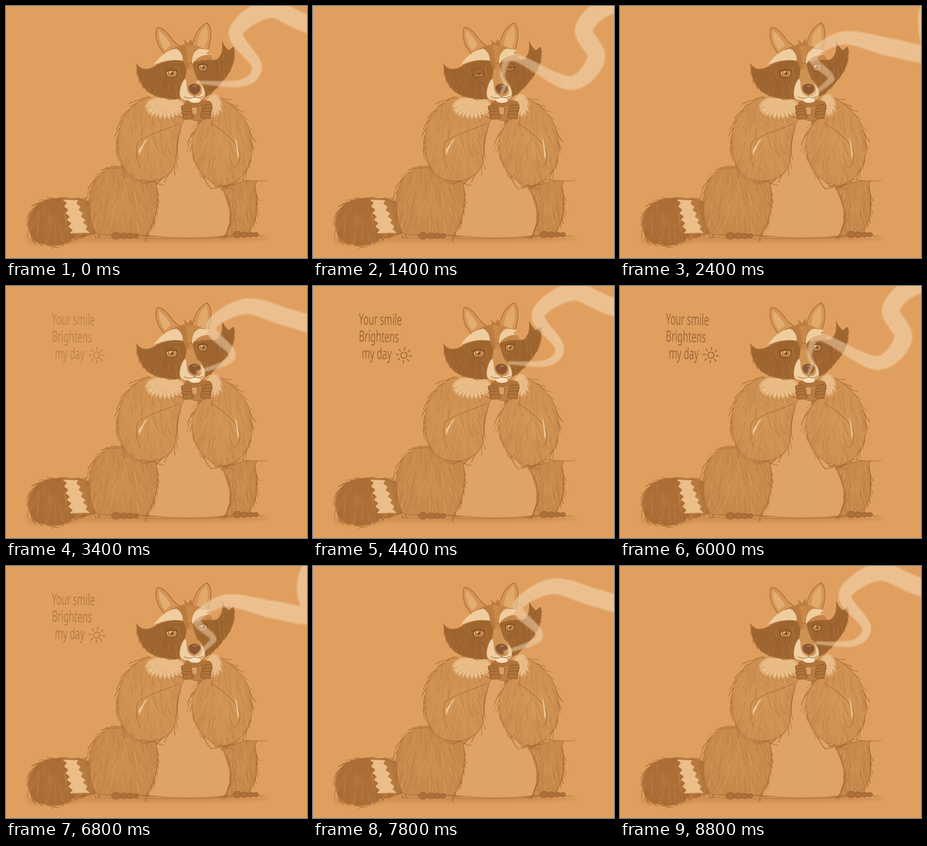
Animation of 500x419 px, one loop 9000 ms. Source, as an HTML page with a canvas:

```html
<!DOCTYPE html>
<html lang="en">
<head>
<meta charset="utf-8">
<title>Raccoon with a cup</title>
<style>
html, body { margin: 0; width: 100%; height: 100%; overflow: hidden; background: #e09f5e; }
canvas { display: block; width: 100vw; height: 100vh; }
</style>
</head>
<body>
<canvas id="stage"></canvas>
<script>
const W = 500, H = 419, LOOP = 9000, STEP = 200, CYCLE = 22;
const INK = '#a96c36', DARK = '#8a5529', MASK = '#a2682f', CREAM = '#f0cd9e';
const scale = Math.max(1, window.devicePixelRatio || 1);
const stage = document.getElementById('stage');
const still = document.createElement('canvas');
for (const c of [stage, still]) { c.width = W * scale; c.height = H * scale; }
const out = stage.getContext('2d');
let g = still.getContext('2d');
out.scale(scale, scale);
g.scale(scale, scale);

let seed = 7;
const rnd = () => (seed = (seed * 16807) % 2147483647) / 2147483647;
const mix = (a, b, t) => a + (b - a) * t;
const clamp = v => Math.max(0, Math.min(1, v));
const smooth = v => (v = clamp(v)) * v * (3 - 2 * v);

function shape(d, fill, line, width = 1, alpha = 1) {
  const p = new Path2D(d);
  g.save();
  g.globalAlpha = alpha;
  g.lineCap = g.lineJoin = 'round';
  if (fill) { g.fillStyle = fill; g.fill(p); }
  if (line) { g.strokeStyle = line; g.lineWidth = width; g.stroke(p); }
  g.restore();
}

function oval(x, y, rx, ry, fill, line) {
  g.beginPath();
  g.ellipse(x, y, rx, ry, 0, 0, 7);
  if (fill) { g.fillStyle = fill; g.fill(); }
  if (line) { g.strokeStyle = line; g.lineWidth = 1; g.stroke(); }
}

function hair(x, y, ang, len) {
  const c = Math.cos(ang) * len, s = Math.sin(ang) * len;
  g.beginPath();
  g.moveTo(x, y);
  g.quadraticCurveTo(x + c / 2 - s * .12, y + s / 2 + c * .12, x + c, y + s);
  g.stroke();
}

// Filled outline with soft strokes inside and hairs that follow its edge downwards
function fur(d, light, dark, { len = 15, gap = 9, coat = 120, soft = .1 } = {}) {
  const path = document.createElementNS('http://www.w3.org/2000/svg', 'path');
  path.setAttribute('d', d);
  const total = path.getTotalLength();
  const edge = Array.from({ length: 60 }, (_, i) => path.getPointAtLength(total * i / 60));
  const cx = edge.reduce((s, p) => s + p.x, 0) / 60, cy = edge.reduce((s, p) => s + p.y, 0) / 60;
  const tone = g.createRadialGradient(cx, cy, 5, cx, cy, Math.sqrt(total) * 4);
  tone.addColorStop(0, light);
  tone.addColorStop(1, dark);
  shape(d, tone, INK, .8, 1);
  g.save();
  g.clip(new Path2D(d));
  g.lineWidth = 1.6;
  g.globalAlpha = soft;
  for (let i = 0; i < coat; i++) {
    const p = edge[Math.floor(rnd() * 60)], t = Math.sqrt(rnd());
    g.strokeStyle = i % 3 ? DARK : '#f3c48c';
    hair(mix(cx, p.x, t), mix(cy, p.y, t), Math.PI / 2 + (cx - p.x) * .006 + rnd() * .3 - .15, 10 + rnd() * 16);
  }
  g.restore();
  g.save();
  g.strokeStyle = INK;
  g.globalAlpha = .85;
  g.lineCap = 'round';
  for (let at = 0; at < total; at += gap * (.5 + rnd())) {
    const p = path.getPointAtLength(at), q = path.getPointAtLength((at + 1) % total);
    const flip = q.y < p.y ? -1 : 1;
    const tx = (q.x - p.x) * flip, ty = (q.y - p.y) * flip;
    const side = tx * (p.y - cy) - ty * (p.x - cx) > 0 ? 1 : -1;
    g.lineWidth = .7 + rnd() * .8;
    hair(p.x, p.y, Math.atan2(ty, tx) + side * (.05 + rnd() * .22), len * (.6 + rnd() * .6));
  }
  g.restore();
}

function ground() {
  g.fillStyle = '#e09f5e';
  g.fillRect(0, 0, W, H);
  g.save();
  g.filter = `blur(${2 * scale}px)`;
  oval(236, 387, 202, 6, 'rgba(185,120,62,.4)');
  oval(76, 391, 42, 6, 'rgba(185,120,62,.4)');
  g.restore();
  shape('M150 385Q300 390 430 382', null, INK, 1, .6);
  for (const x of [240, 246, 258]) oval(x, 401, .8, .6, '#c08146');
}

function tail() {
  fur('M96 321Q130 317 146 334L152 376Q125 386 98 383Z', '#b87b40', '#b2743a', { gap: 5 });
  fur('M97 322C76 315 46 325 39 350C34 377 45 396 66 396C90 400 106 394 113 382Z',
    '#af7138', '#a96b34', { soft: .08 });
  g.beginPath();
  for (let i = 0; i < 11; i++) g.lineTo(94 + i * 1.2 + i % 2 * 6, 322 + i * 5.6);
  for (let i = 10; i >= 0; i--) g.lineTo(120 + i * 1.9 - i % 2 * 5, 323 + i * 5.4);
  g.fillStyle = '#ebbd87';
  g.fill();
}

function toes(x, y, r, n) {
  for (let i = 0; i < n; i++) {
    oval(x, y, r, r * .75, '#ad7039', '#98602f');
    x += r * 1.7;
    r *= .86;
  }
}

function body() {
  shape('M240 151Q186 175 187 230L250 300H358L406 232Q405 175 350 151Z', '#d29553');
  shape('M288 180C286 226 282 268 247 300Q253 345 234 381Q300 390 366 382Q382 340 358 300C326 280 314 245 320 180Z',
    '#dea365', INK, .8);
  fur('M172 270C148 280 138 303 139 330Q138 365 152 380L233 381C250 358 256 325 249 294L205 268Z',
    '#ce9050', '#c68849', { len: 19, coat: 200 });
  fur('M358 302C378 298 398 288 418 291C410 298 417 305 416 322C418 350 410 372 396 381L364 383C382 350 372 322 358 302Z',
    '#ca8c4c', '#c68849', { len: 17 });
  toes(183, 382, 7.5, 4);
  toes(384, 380, 7, 4);
}

function arms() {
  fur('M238 151C205 162 186 192 186 225C186 255 197 281 218 288C245 296 268 287 278 270C287 250 281 215 297 186Q262 182 238 151Z',
    '#d29554', '#cc8f4f', { len: 20, gap: 11, coat: 180 });
  fur('M352 152C385 165 407 195 408 229C411 262 395 289 368 298C340 302 315 275 309 239Q306 212 327 189Q350 178 352 152Z',
    '#d29554', '#cc8f4f', { len: 20, gap: 11, coat: 180 });
  shape('M288 195C265 207 236 212 219 227Q213 245 222 268M340 195C366 211 389 230 389 250Q388 262 380 269',
    null, INK, 1.1, .85);
  g.strokeStyle = CREAM;
  g.lineWidth = 1.4;
  for (let i = 0; i < 7; i++) {
    hair(234 - i * 2, 222 + i * 2.5, 2.2 - i * .1, 10);
    hair(381 + i, 221 + i * 4, 1.2 + i * .1, 8);
  }
}

function chest() {
  const tuft = (x, y, rx, ry, n) => {
    g.save();
    g.filter = `blur(${1.5 * scale}px)`;
    oval(x, y, rx, ry, 'rgba(238,195,143,.85)');
    g.restore();
    g.lineWidth = .9;
    for (let i = 0; i < n; i++) {
      const a = Math.PI * (i + rnd()) / n;
      g.strokeStyle = i % 3 ? '#f3cfa0' : '#c08349';
      hair(x + Math.cos(a) * rx * .75, y + Math.sin(a) * ry * .7, mix(a, 1.7, .4), 9);
    }
  };
  tuft(264, 167, 32, 17, 34);
  tuft(345, 164, 13, 17, 18);
}

function ears() {
  shape('M263 79C251 67 246 47 251 36C259 33 272 49 278 58L291 69L284 82Z', '#d59556', INK, 1.2);
  shape('M264 74Q252 56 254 40Q267 52 274 65Z', '#e4ae72');
  shape('M309 74C309 53 321 33 334 28C343 35 342 55 335 75Z', '#d59556', INK, 1.2);
  shape('M317 70Q318 44 333 33Q339 52 330 70Z', '#e2a96b');
}

function head() {
  shape('M257 84Q275 68 300 62Q335 66 346 94L334 146L292 152L252 110Z', '#c68748');
  shape('M271 75Q285 65 298 65L295 56L303 62L307 55L312 66Q313 100 319 128H302L291 91Z', '#bc7c40');
  shape('M298 66Q306 95 301 128L316 127Q309 100 312 66Z', '#c98949');
  const plain = { len: 8, gap: 12, coat: 90, soft: .07 };
  fur('M217 97C228 111 242 104 253 97Q275 89 292 88Q303 105 298 124Q289 138 292 154C270 157 248 151 237 143C223 132 218 118 217 97Z',
    '#9d632f', MASK, plain);
  fur('M310 95Q325 89 348 90C358 86 361 73 359 59Q364 70 370 74L378 68C382 86 375 109 361 123Q345 145 330 151Q330 135 317 123Z',
    '#9d632f', MASK, plain);
  shape('M245 98C255 84 267 73 283 71Q293 76 294 91Q268 87 245 98Z', CREAM);
  shape('M309 97Q308 75 322 71L338 73L333 79L341 81Q319 80 309 97Z', CREAM);
}

function muzzle() {
  shape('M300 105Q299 121 291 134C285 148 290 157 302 157C316 158 331 156 330 147Q331 131 318 122L310 103Z', '#cf9252');
  shape('M297 121C302 123 299 134 302 141C305 150 315 151 322 148Q329 142 321 128Q333 137 330 151C322 159 297 160 290 153C286 144 291 127 297 121Z',
    '#efcfa2', '#c08449', .6);
  shape('M303 136C304 127 321 127 323 136C323 143 318 147 313 147Q304 145 303 136Z', '#8c5730');
  oval(314, 133, 4, 1.6, 'rgba(200,145,95,.5)');
  shape('M313 147V151Q306 156 296 151M313 151Q320 155 328 150', null, '#9d6535', 1);
}

function cup() {
  shape('M296 163Q296 190 318 191Q342 189 342 163Z', '#bd7f43', INK);
  oval(319, 161, 22, 4.5, '#b27439', INK);
  oval(314, 157, 10, 4, 'rgba(255,232,200,.9)');
  shape('M304 168H318V180Q310 184 304 178Z', '#d9a062', '#96602f');
  for (let i = 0; i < 4; i++) {
    shape(`M${292 + i} ${166 + i * 5}q8 -3 15 1q3 3 -1 5q-8 2 -14 1Z`, '#b1743b', '#8f592b');
    shape(`M${342 - i} ${165 + i * 5}q-8 -2 -16 2q-2 3 2 4q8 2 14 1Z`, '#b1743b', '#8f592b');
  }
}

function eye(x, y, rx, ry, lid) {
  g.save();
  oval(x, y, rx + 2, ry + 1.5, '#8a552a');
  g.beginPath();
  g.ellipse(x, y, rx, ry, 0, 0, 7);
  g.clip();
  g.fillStyle = '#e6b27a';
  g.fillRect(x - rx, y - ry, rx * 2, ry * 2);
  oval(x, y, rx * .7, ry * .85, '#cb8d4d', '#8d5829');
  oval(x + .5, y, rx * .34, ry * .42, '#85512a');
  oval(x - 2, y - 2, 1.5, 1.3, '#ffe8c6');
  const top = y - ry + ry * lid * 1.4, low = y + ry - ry * lid * .6;
  g.fillStyle = MASK;
  g.fillRect(x - rx, y - ry, rx * 2, top - y + ry);
  g.fillRect(x - rx, low, rx * 2, ry);
  g.restore();
  shape(`M${x - rx - 2} ${top + 2}Q${x} ${top - 2} ${x + rx + 1} ${top + 1}`, null, '#7d4b22', 1.2);
}

// One wave of the plume at age n (in steps): trough, right bend, left bend, crest
const wave = n => [
  [340 + 4.8 * n, 128 - 55 * smooth((n - 18) / 4) - 4 * Math.max(0, n - CYCLE)],
  [343 + 6 * n + .06 * n * n, 118 - 1.7 * n],
  [Math.max(316, 317 + 3.6 * n + .21 * n * n), Math.max(40, 88 - 4 * n)],
  [365 + 6.5 * n, Math.max(4, 58 - 4.8 * n)]
];

function plume(phase) {
  const age = phase - CYCLE / 2, c = Math.cos(phase / CYCLE * 2 * Math.PI);
  const root = [315 + 7 * c, 142 - 15 * c];
  const grown = smooth((age + 11) / 9);
  const young = wave(age).map(p => p.map((v, i) => mix(root[i], v, grown)));
  return [root, ...young, ...wave(age + CYCLE), ...wave(age + 2 * CYCLE)];
}

const spline = (a, b, c, d, t) =>
  .5 * (2 * b + (c - a) * t + (2 * a - 5 * b + 4 * c - d) * t * t + (3 * b - a - 3 * c + d) * t * t * t);

function steam(phase) {
  const pts = plume(phase), line = [];
  const at = i => pts[Math.max(0, Math.min(pts.length - 1, i))];
  let run = 0, last = pts[0];
  for (let i = 0; i < pts.length - 1; i++) {
    for (let k = 0; k < 14; k++) {
      const [x, y] = [0, 1].map(c => spline(at(i - 1)[c], at(i)[c], at(i + 1)[c], at(i + 2)[c], k / 14));
      const dx = x - last[0], dy = y - last[1], d = Math.hypot(dx, dy);
      if (d < .4) continue;
      run += d;
      line.push([x, y, -dy / d, dx / d, Math.min(15, 2 + run * .055)]);
      last = [x, y];
    }
  }
  const edge = s => line.map(([x, y, nx, ny, w]) => [x + nx * w * s, y + ny * w * s]);
  const trace = list => list.forEach(p => g.lineTo(...p));
  const tone = g.createRadialGradient(314, 140, 10, 314, 140, 110);
  tone.addColorStop(0, 'rgba(238,212,180,.32)');
  tone.addColorStop(1, 'rgba(243,210,170,.62)');
  g.save();
  g.filter = `blur(${1.3 * scale}px)`;
  g.fillStyle = tone;
  g.beginPath();
  trace(edge(1));
  trace(edge(-1).reverse());
  g.fill();
  g.strokeStyle = 'rgba(250,224,190,.2)';
  g.lineWidth = 2;
  for (let s = -.7; s < 1; s += .45) {
    g.beginPath();
    trace(edge(s));
    g.stroke();
  }
  g.restore();
}

function note(k) {
  const ms = k * STEP;
  const alpha = Math.min((ms - 2600) / 1600, 1, (7600 - ms) / 1200);
  if (alpha <= 0) return;
  g.save();
  g.globalAlpha = alpha;
  g.fillStyle = g.strokeStyle = '#a0683a';
  g.font = '500 26px "Noto Sans", "Open Sans", sans-serif';
  ['Your smile', 'Brightens', 'my day'].forEach((text, i) => {
    g.save();
    g.translate(i < 2 ? 76 : 81, 64 + i * 28.5);
    g.rotate(.02);
    g.scale(.56, 1);
    g.fillText(text, 0, 0);
    g.restore();
  });
  g.lineWidth = 1.7;
  g.lineCap = 'round';
  g.beginPath();
  g.arc(151, 115, 5, 0, 7);
  g.stroke();
  for (let i = 0; i < 8; i++) {
    const a = i * Math.PI / 4 + (k % 4 < 2 ? 0 : .1), c = Math.cos(a), s = Math.sin(a);
    g.beginPath();
    g.moveTo(151 + c * 9, 115 + s * 9);
    g.lineTo(151 + c * 13, 115 + s * 13);
    g.stroke();
  }
  g.restore();
}

const blink = (k, mid) => clamp(1 - Math.abs(k - mid) / 2.6);

function frame(now) {
  const k = Math.floor(now % LOOP / STEP);
  const beat = k > 12 ? k - 1 : k; // the plume rests for one step
  const lid = .18 + .58 * Math.max(blink(k, 7), blink(k, 42));
  g.drawImage(still, 0, 0, W, H);
  eye(275, 112, 8, 6.5, lid);
  eye(327, 102, 6.5, 6, lid);
  note(k);
  steam(beat % CYCLE);
}

[ground, tail, body, arms, chest, ears, head, muzzle, cup].forEach(draw => draw());
g = out;
const start = performance.now();
function tick() {
  frame(performance.now() - start);
  requestAnimationFrame(tick);
}
tick();
</script>
</body>
</html>
```
